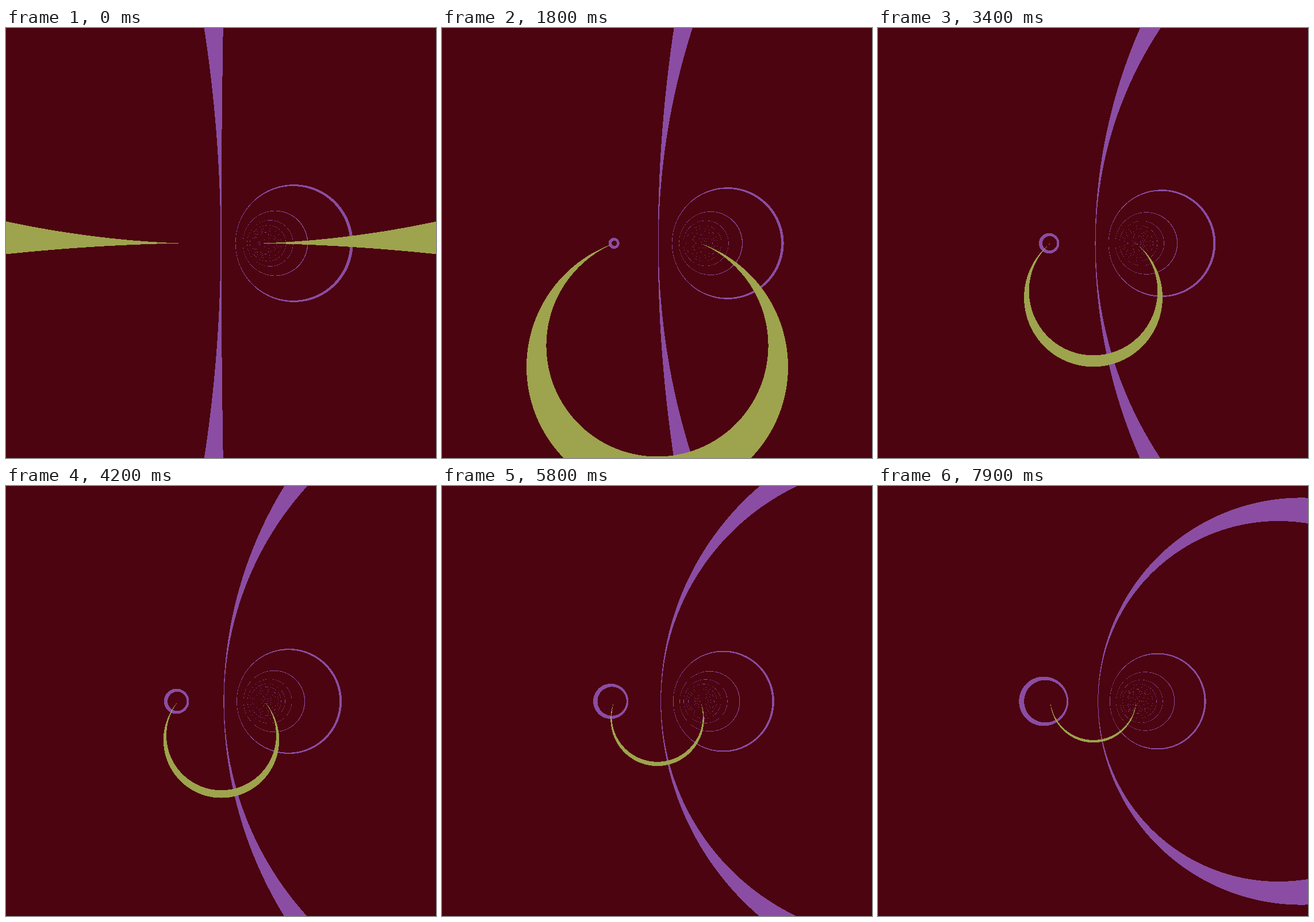
An HTML page with a canvas for the animation above (8 s loop, 748 by 748 pixels).

```html
<!DOCTYPE html>
<html lang="en">
<head>
<meta charset="utf-8">
<title>Bipolar circles</title>
<style>
  html, body { margin: 0; width: 100%; height: 100%; overflow: hidden; background: #4c0410; }
  canvas { display: block; width: 748px; height: 748px; }
</style>
</head>
<body>
<canvas id="stage" width="748" height="748"></canvas>
<script>
  const SIZE = 748, UNIT = SIZE / 10, MID = SIZE / 2;
  const STEP_MS = 100, STEPS = 80, CYCLE = 300;
  const RING_WIDTH = 10 / CYCLE, ARC_WIDTH = 3 / CYCLE;

  const ctx = document.getElementById('stage').getContext('2d');
  const image = ctx.createImageData(SIZE, SIZE);
  const pixels = new Uint32Array(image.data.buffer);

  // Packs 0xRRGGBB as an opaque little-endian pixel.
  const pack = c => (0xff000000 | (c & 255) << 16 | (c & 0xff00) | c >> 16) >>> 0;
  const BACK = pack(0x4c0410), RING = pack(0x8a4da3), ARC = pack(0x9ea34d);

  // Fractional modulus and turn of (z + 1) / (z - 1) at every pixel.
  const modulus = new Float32Array(SIZE * SIZE);
  const turn = new Float32Array(SIZE * SIZE);
  for (let row = 0, i = 0; row < SIZE; row++) {
    const y = (row - MID) / UNIT;
    for (let col = 0; col < SIZE; col++, i++) {
      const x = (col - MID) / UNIT;
      const ratio = Math.sqrt(((x + 1) ** 2 + y * y) / ((x - 1) ** 2 + y * y));
      modulus[i] = ratio % 1;
      turn[i] = Math.atan2(2 * y, x * x + y * y - 1) / (2 * Math.PI);
    }
  }

  // True when value lies within width behind the moving front, on a unit circle.
  function inBand(value, front, width) {
    let gap = front - value;
    if (gap < 0) gap += 1;
    return gap < width;
  }

  function draw(step) {
    const front = (step + 1) / CYCLE;
    for (let i = 0; i < pixels.length; i++) {
      pixels[i] = inBand(turn[i], front, ARC_WIDTH) ? ARC
        : inBand(modulus[i], front, RING_WIDTH) ? RING : BACK;
    }
    ctx.putImageData(image, 0, 0);
  }

  let shown = -1;
  function tick() {
    const step = Math.floor(performance.now() / STEP_MS) % STEPS;
    if (step !== shown) draw(shown = step);
    requestAnimationFrame(tick);
  }
  tick();
</script>
</body>
</html>
```
